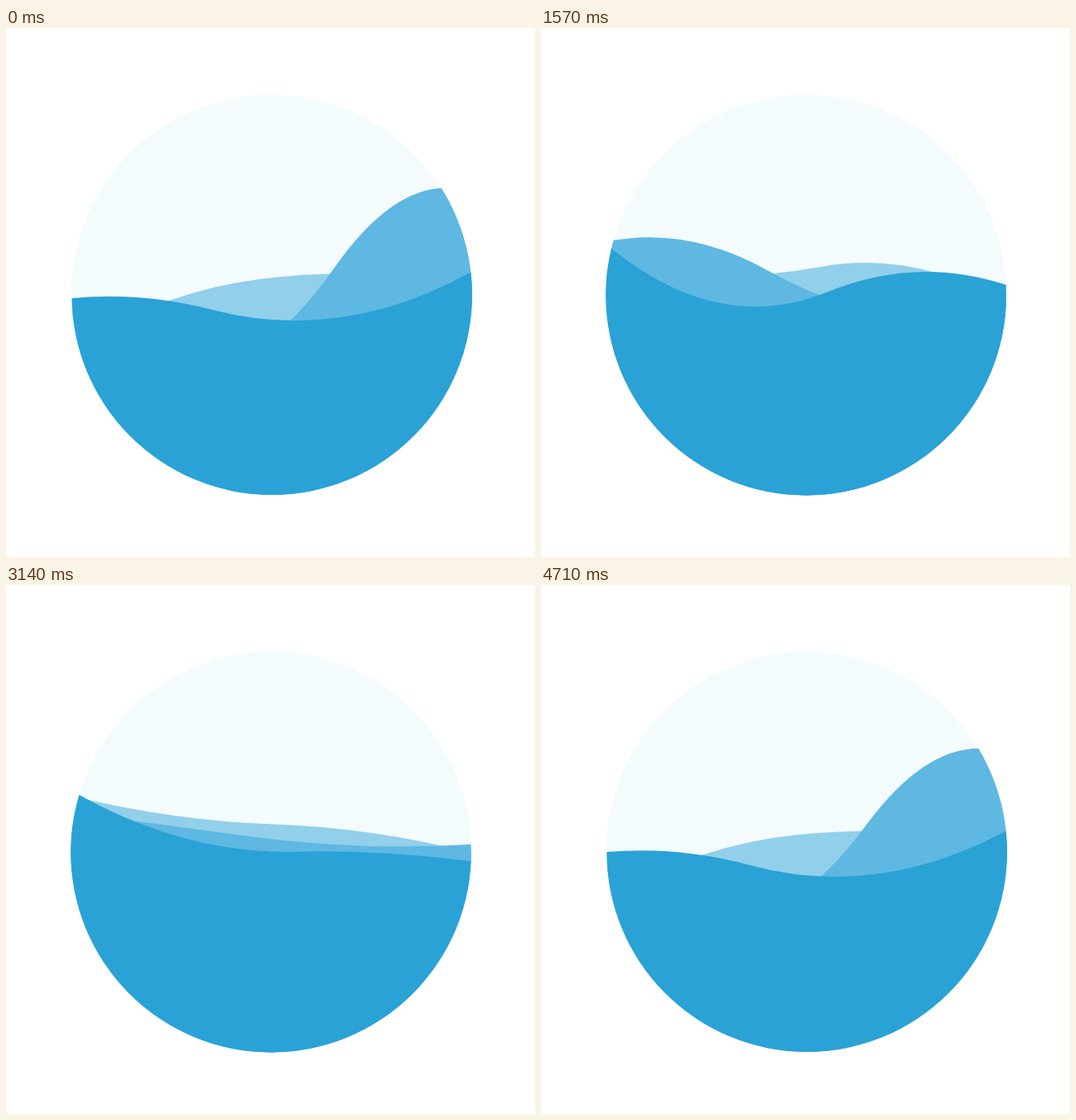
Write an HTML page with a canvas that moves like this. It is 640 px wide and 640 px high and loops after 4780 ms.

```html
<!DOCTYPE html>
<html lang="en">
<head>
<meta charset="utf-8">
<title>Sloshing water</title>
<style>
  html, body { margin: 0; width: 100%; height: 100%; overflow: hidden; background: #fff; }
  canvas { display: block; width: 640px; height: 640px; }
</style>
</head>
<body>
<canvas id="stage" width="640" height="640"></canvas>
<script>
const ctx = document.getElementById('stage').getContext('2d');
const LOOP = 4780, STEPS = 67;
const LEFT = 78, RIGHT = 565, BOTTOM = 580;

// A crest and a trough meet at a joint; one pose per quarter of the loop
const pose = (left, x, y, slope, right) => ({ left, x, y, slope, right });

const waves = [
  { color: '#92cfea', poses: [
    pose(385, 310, 303.5, -.12, 309),
    pose(312, 332, 282, -.11, 345),
    pose(228, 351, 304, -.34, 307),
    pose(271, 310, 281, .26, 335)
  ] },
  { color: '#5eb8e2', poses: [
    pose(340, 398, 289, -1.42, 199),
    pose(277, 305, 290, .43, 315),
    pose(219, 211, 303, .86, 370),
    pose(310, 330, 303, -.29, 280)
  ] },
  { color: '#2aa2d6', poses: [
    pose(327, 250, 341, .26, 294),
    pose(278, 318, 308, -.26, 299),
    pose(223, 410, 344, -.73, 339),
    pose(263, 310, 310, .4, 332)
  ] }
];

function poseAt(poses, progress) {
  const place = progress * poses.length;
  const index = Math.floor(place);
  const from = poses[index], to = poses[(index + 1) % poses.length];
  const mixed = {};
  for (const key in from) mixed[key] = from[key] + (to[key] - from[key]) * (place - index);
  return mixed;
}

function drawWave({ color, poses }, progress) {
  const { left, x, y, slope, right } = poseAt(poses, progress);
  // Both parabolas share the tangent through the joint
  const tangent = px => y + slope * (px - x);
  const midLeft = (LEFT + x) / 2, midRight = (x + RIGHT) / 2;
  ctx.fillStyle = color;
  ctx.beginPath();
  ctx.moveTo(LEFT, BOTTOM);
  ctx.lineTo(LEFT, left);
  ctx.quadraticCurveTo(midLeft, tangent(midLeft), x, y);
  ctx.quadraticCurveTo(midRight, tangent(midRight), RIGHT, right);
  ctx.lineTo(RIGHT, BOTTOM);
  ctx.fill();
}

function disc(x, y) {
  ctx.beginPath();
  ctx.arc(x, y, 242.2, 0, Math.PI * 2);
}

function draw(now) {
  const step = Math.floor((now % LOOP) * STEPS / LOOP + .1) % STEPS;
  const progress = step / STEPS;
  const sway = Math.cos(progress * Math.PI * 2);
  ctx.fillStyle = '#fff';
  ctx.fillRect(0, 0, 640, 640);
  ctx.fillStyle = '#f3fbfd';
  disc(321, 323);
  ctx.fill();
  ctx.save();
  disc(321 + .7 * sway, 323 - .4 * sway);
  ctx.clip();
  for (const wave of waves) drawWave(wave, progress);
  ctx.restore();
}

const began = performance.now();
function tick() {
  draw(performance.now() - began);
  requestAnimationFrame(tick);
}
tick();
</script>
</body>
</html>
```
